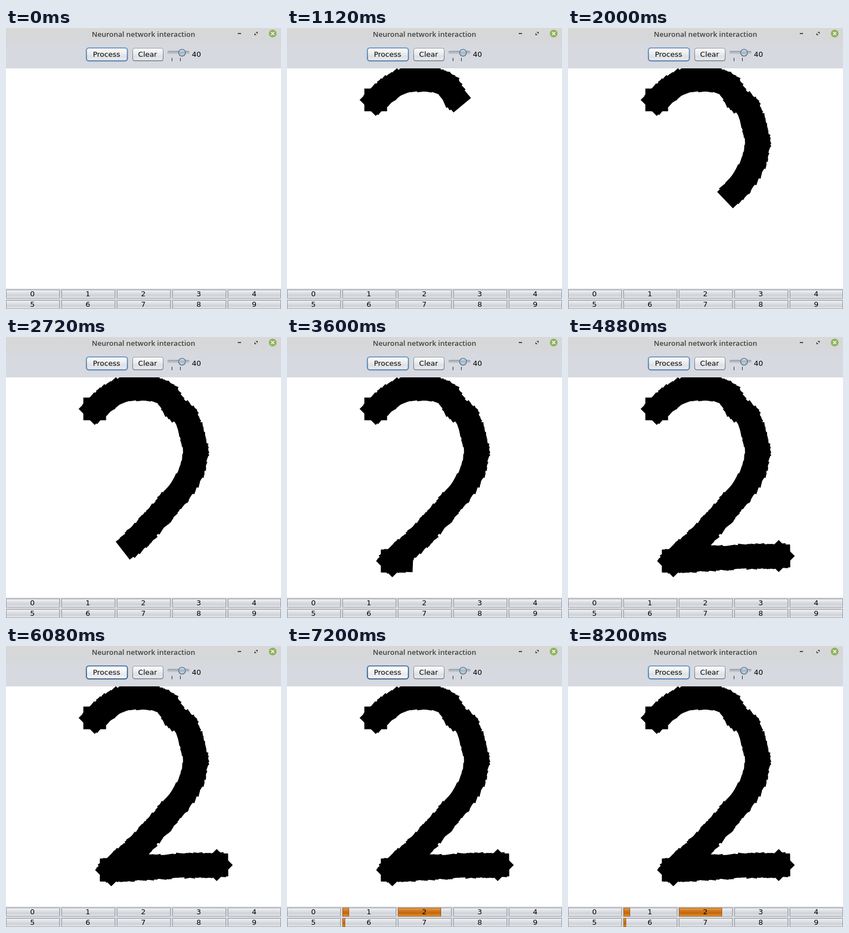
An HTML page with a canvas that plays this animation: 496x508 px, repeating every 8280 ms.

```html
<!DOCTYPE html>
<html lang="en">
<head>
<meta charset="utf-8">
<title>Neuronal network interaction</title>
<style>
  html, body { margin: 0; width: 100%; height: 100%; overflow: hidden; background: #d6d9df; }
  canvas { display: block; }
</style>
</head>
<body>
<canvas id="stage" width="496" height="508"></canvas>
<script>
const ctx = document.getElementById('stage').getContext('2d');
const LOOP = 8280;
const BRUSH = 41, STEP = 4, WOBBLE = 0.42;
const UI_FONT = '13px "DejaVu Sans", sans-serif';
const HOVER_FROM = 5720, PRESS_FROM = 6120, RESULT_FROM = 6280, HOVER_TO = 7400;
const SCORES = { 1: 0.12, 2: 0.8, 6: 0.055 };

// Key poses of the pen: time, x, y.
const STROKES = [
  [[80, 160, 130], [390, 200, 100], [650, 240, 93], [910, 281, 100], [1110, 303, 124],
   [1270, 326, 150], [1550, 341, 205], [1745, 330, 252], [1990, 298, 297], [2600, 240, 361], [3040, 190, 405]],
  [[3400, 190, 405], [4280, 300, 398], [4860, 380, 396]]
];

function seededRandom(seed) {
  return () => (seed = seed * 16807 % 2147483647) / 2147483647;
}

function spline(a, b, c, d, u) {
  return b + u * ((c - a) + u * ((2 * a - 5 * b + 4 * c - d) + u * (3 * (b - c) + d - a))) / 2;
}

// Square brush marks along each stroke, slightly turned by an unsteady hand.
function buildMarks() {
  const random = seededRandom(2);
  const marks = [];
  const rest = ([time, x, y]) => {
    for (const angle of [0, Math.PI / 4]) marks.push({ time, x, y, angle });
  };
  for (const keys of STROKES) {
    const key = i => keys[Math.max(0, Math.min(keys.length - 1, i))];
    rest(keys[0]);
    for (let i = 0; i < keys.length - 1; i++) {
      const at = (axis, u) => spline(key(i - 1)[axis], key(i)[axis], key(i + 1)[axis], key(i + 2)[axis], u);
      const [t0, x0, y0] = key(i), [t1, x1, y1] = key(i + 1);
      const count = Math.round(Math.hypot(x1 - x0, y1 - y0) / STEP);
      for (let k = 1; k <= count; k++) {
        const u = k / count, before = u - 1 / count;
        const x = at(1, u), y = at(2, u);
        const heading = Math.atan2(y - at(2, before), x - at(1, before));
        marks.push({ time: t0 + (t1 - t0) * u, x, y, angle: heading + (random() - 0.5) * WOBBLE });
      }
    }
    rest(keys[keys.length - 1]);
  }
  return marks;
}
const marks = buildMarks();

function vertical(y, h, colors) {
  const g = ctx.createLinearGradient(0, y, 0, y + h);
  colors.forEach((c, i) => g.addColorStop(i / (colors.length - 1), c));
  return g;
}

function rect(x, y, w, h, fill) {
  ctx.fillStyle = fill;
  ctx.fillRect(x, y, w, h);
}

function rounded(x, y, w, h, r, fill) {
  ctx.beginPath();
  ctx.roundRect(x, y, w, h, r);
  ctx.fillStyle = fill;
  ctx.fill();
}

function disc(x, y, r, fill) {
  ctx.beginPath();
  ctx.arc(x, y, r, 0, Math.PI * 2);
  ctx.fillStyle = fill;
  ctx.fill();
}

function label(text, x, y, font = UI_FONT, color = '#000') {
  ctx.font = font;
  ctx.fillStyle = color;
  ctx.textAlign = 'center';
  ctx.fillText(text, x, y);
}

function drawTitleBar() {
  rect(0, 0, 496, 73, vertical(0, 36, ['#d8d8d8', '#d6d7d9', '#d6d9df']));
  label('Neuronal network interaction', 248, 16, '600 13px "Open Sans", sans-serif', '#404040');
  rect(418, 9, 6, 2, '#484848');
  ctx.fillStyle = '#484848';
  for (const side of [-1, 1]) {
    const x = 451 + 3 * side, y = 10 - 3 * side;
    ctx.beginPath();
    ctx.moveTo(x, y);
    ctx.lineTo(x - 4 * side, y);
    ctx.lineTo(x, y + 4 * side);
    ctx.fill();
  }
  disc(481, 10, 7, '#8fb35f');
  ctx.strokeStyle = '#fff';
  ctx.lineWidth = 1.6;
  for (const side of [-1, 1]) {
    ctx.beginPath();
    ctx.moveTo(481 - 2.7 * side, 7.3);
    ctx.lineTo(481 + 2.7 * side, 12.7);
    ctx.stroke();
  }
}

const FACES = {
  idle: ['#fbfbfc', '#eff0f2', '#dde0e5', '#eceef1'],
  hover: ['#ffffff', '#f5f6f8', '#e6e9ee', '#f8f9fb'],
  pressed: ['#8c96a6', '#a3adbd', '#adb7c6', '#c2cad6']
};

function drawButton(x, w, text, focused, state) {
  if (focused) rounded(x - 1.2, 34.9, w + 2.4, 25.8, 5.5, state === 'idle' ? '#73a4d1' : '#6188b3');
  else rounded(x, 37.5, w, 23, 4.5, '#b9bec7');
  const edge = !focused ? ['#989da6', '#585d66']
    : state === 'idle' ? ['#7795b4', '#426188'] : ['#54759b', '#2b4569'];
  rounded(x, 36, w, 23.5, 4.5, vertical(36, 24, edge));
  rounded(x + 1, 37, w - 2, 21.5, 3.5, vertical(37, 22, FACES[state]));
  label(text, x + w / 2 - 0.7, 52);
}

function drawSlider() {
  rounded(291, 41.5, 40, 5.5, 2.5, vertical(41, 6, ['#858b95', '#b3b8c1', '#c6cad1']));
  rect(299, 54, 1, 6, '#222');
  rect(314, 54, 1, 6, '#222');
  disc(317.5, 45, 6.8, '#9299a4');
  disc(317.5, 44.5, 6.6, '#49617a');
  disc(317.5, 44.5, 5.6, vertical(39, 11, ['#d4e0e9', '#9fb7c9', '#c4d8e5']));
  label('40', 343.6, 52);
}

function drawBar(digit, score) {
  const x = digit % 5 * 100, y = digit < 5 ? 473 : 492, w = Math.min(97, 496 - x);
  rect(x, y, w, 16, '#92969e');
  rect(x + 1, y + 1, w - 2, 14, vertical(y + 1, 14, ['#f0f1f3', '#dfe1e5', '#cfd2d7', '#e4e6e9']));
  rect(x, y + 15, w, 1, '#a7abb2');
  if (score) {
    const fill = Math.round(w * score);
    rect(x, y, fill, 16, '#a3560b');
    rect(x + 1, y + 1, fill - 2, 14, vertical(y + 1, 14, ['#e1a15e', '#cf771d', '#c2670a', '#e4973d']));
  }
  label(digit, x + 47.7, y + 12);
}

function drawInk(t) {
  rect(0, 73, 496, 398, '#fff');
  ctx.save();
  ctx.beginPath();
  ctx.rect(0, 73, 496, 398);
  ctx.clip();
  for (const { time, x, y, angle } of marks) {
    if (time > t) break;
    ctx.save();
    ctx.translate(x, y);
    ctx.rotate(angle);
    rect(-BRUSH / 2, -BRUSH / 2, BRUSH, BRUSH, '#000');
    ctx.restore();
  }
  ctx.restore();
}

function draw(t) {
  rect(0, 0, 496, 508, '#d6d9df');
  drawTitleBar();
  const pressed = t >= PRESS_FROM && t < RESULT_FROM;
  const hover = t >= HOVER_FROM && t < HOVER_TO;
  drawButton(145, 74, 'Process', true, pressed ? 'pressed' : hover ? 'hover' : 'idle');
  drawButton(228, 56, 'Clear', false, 'idle');
  drawSlider();
  drawInk(t);
  for (let digit = 0; digit < 10; digit++) {
    drawBar(digit, t >= RESULT_FROM && SCORES[digit]);
  }
}

const start = performance.now();
function frame() {
  const t = (performance.now() - start) % LOOP;
  draw(Math.floor(t / 40) * 40);
  requestAnimationFrame(frame);
}
frame();
</script>
</body>
</html>
```
